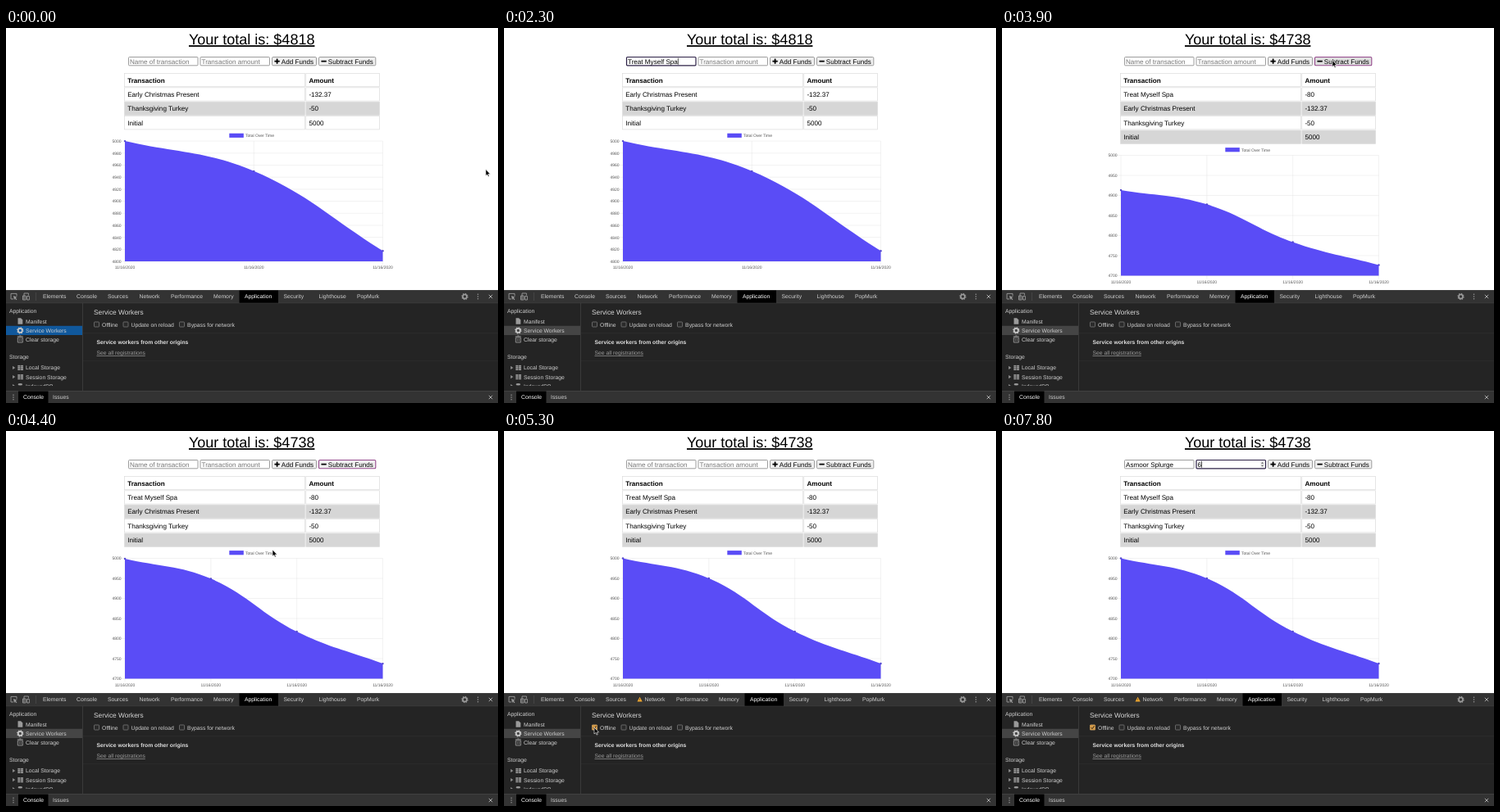
An HTML page that plays this animation: 600x458 px, repeating every 8 s.

```html
<!DOCTYPE html>
<html lang="en">
<head>
<meta charset="utf-8">
<title>Budget tracker</title>
<style>
  html, body { margin: 0; width: 100%; height: 100%; overflow: hidden; background: #fff; }
  svg { display: block; width: 600px; height: 458px; }
  text {
    font-family: "Liberation Sans", Arial, sans-serif;
    text-rendering: geometricPrecision;
    white-space: pre;
  }
</style>
</head>
<body>
<svg id="stage" viewBox="0 0 600 458"></svg>
<script>
const LOOP = 8000, STEP = 100;
const SUBMIT = 3800, CHART_START = 3633, CHART_MS = 1000;
const OFFLINE = 5300;
const BLUE = '#5a4cf6', PALE = '#cfcfcf', GREY = '#9a9a9a';
const stage = document.getElementById('stage');

function add(parent, tag, attrs = {}, content) {
  const node = document.createElementNS('http://www.w3.org/2000/svg', tag);
  set(node, attrs);
  if (content !== undefined) node.textContent = content;
  return parent.appendChild(node);
}
function set(node, attrs) {
  for (const k in attrs) node.setAttribute(k, attrs[k]);
}
const group = (parent, attrs) => add(parent, 'g', attrs);
const rect = (p, x, y, width, height, fill, more) =>
  add(p, 'rect', { x, y, width, height, fill, ...more });
const path = (p, d, attrs) => add(p, 'path', { d, fill: 'none', ...attrs });
// y is the middle of the capitals
const label = (p, str, x, y, size, fill, more) =>
  add(p, 'text', { x, y: y + size * 0.36, 'font-size': size, fill, ...more }, str);
const show = (node, on) => node.setAttribute('visibility', on ? 'visible' : 'hidden');

// ---------- budget page ----------
const SIZE = 8.1;
const title = label(stage, '', 299.7, 13.6, 18, '#000',
  { 'text-anchor': 'middle', 'text-decoration': 'underline' });

function makeInput(x, hint) {
  const box = rect(stage, x + 0.5, 35.5, 84.5, 10.3, '#fff', { rx: 1 });
  const text = label(stage, '', x + 2, 40.6, SIZE, '#000');
  const caret = rect(stage, 0, 36.7, 0.7, 8, '#000');
  return (value, focused, blinkOff) => {
    set(box, { stroke: focused ? '#2c2046' : '#858585', 'stroke-width': focused ? 1.2 : 0.8 });
    text.textContent = value || hint;
    set(text, { fill: value ? '#000' : '#757575' });
    caret.setAttribute('x', x + 2 + (value ? text.getComputedTextLength() : 0));
    show(caret, focused && !blinkOff);
  };
}
const nameInput = makeInput(149, 'Name of transaction');
const amountInput = makeInput(236.5, 'Transaction amount');

const spinner = group(stage);
rect(spinner, 315, 36.6, 5, 8.2, '#efefef', { rx: 1 });
path(spinner, 'M316 39.7l1.5-1.7 1.5 1.7zM316 41.7l1.5 1.7 1.5-1.7z', { fill: '#555' });

function makeButton(x, width, text) {
  const box = rect(stage, x + 0.5, 35.5, width, 10.3, '#efefef',
    { rx: 1.3, stroke: '#858585', 'stroke-width': 0.8 });
  rect(stage, x + 3.4, 39.7, 6.4, 1.8, '#000', { rx: 0.4 });
  label(stage, text, x + 11.8, 40.6, SIZE, '#000');
  return box;
}
makeButton(324, 54, 'Add Funds');
rect(stage, 329.7, 37.4, 1.8, 6.4, '#000', { rx: 0.4 });
const subtract = makeButton(381, 69.3, 'Subtract Funds');

const ROW = 17.4;
function makeTable(parent, rows) {
  [['Transaction', 'Amount'], ...rows].forEach((cells, i) => {
    const y = 55.4 + i * ROW, fill = i && i % 2 === 0 ? '#d6d6d6' : '#fff';
    [[144.6, 220], [365.8, 89.8]].forEach(([x, w], c) => {
      rect(parent, x, y, w, 16.3, fill, { stroke: '#dcdcdc', 'stroke-width': 0.7 });
      label(parent, cells[c], x + 3.6, y + 8.3, SIZE, '#000', { 'font-weight': i ? 400 : 700 });
    });
  });
}

// Cardinal-like spline with tension 0.4
function splinePath(pts) {
  const handles = pts.map((p, i) => {
    const a = pts[i - 1] || p, b = pts[i + 1] || p;
    const da = Math.hypot(p[0] - a[0], p[1] - a[1]);
    const db = Math.hypot(b[0] - p[0], b[1] - p[1]);
    const ka = 0.4 * da / (da + db), kb = 0.4 * db / (da + db);
    const dx = b[0] - a[0], dy = b[1] - a[1];
    return [[p[0] - ka * dx, p[1] - ka * dy], [p[0] + kb * dx, p[1] + kb * dy]];
  });
  return 'M' + pts[0] + pts.slice(1).map((p, i) =>
    `C${handles[i][1]} ${handles[i + 1][0]} ${p}`).join('');
}

function makeChart(parent, top, low, tick, values) {
  const left = 145, wide = 314.5, high = 147, base = top + high;
  const grid = { stroke: '#e4e4e4', 'stroke-width': 0.5 };
  const small = (str, x, y, anchor) =>
    label(parent, str, x, y, 5, '#555', { 'text-anchor': anchor });
  rect(parent, 272.3, top - 9.4, 17.5, 5.2, BLUE);
  small('Total Over Time', 292, top - 6.7, 'start');
  for (let v = low; v <= 5000; v += tick) {
    const y = base - (v - low) / (5000 - low) * high;
    path(parent, `M${left - 4} ${y}H${left + wide}`, grid);
    small(v, 140.6, y, 'end');
  }
  const pts = values.map((v, i) => [
    left + wide * i / (values.length - 1),
    base - (v - low) / (5000 - low) * high
  ]);
  pts.forEach(([x]) => {
    path(parent, `M${x} ${top}V${base + 4}`, grid);
    small('11/16/2020', x, base + 7.3, 'middle');
  });
  const area = path(parent, '', { fill: BLUE });
  const dots = pts.map(([x]) => add(parent, 'circle', { cx: x, r: 1.2, fill: '#5347cf' }));
  return grow => {
    const now = pts.map(([x, y]) => [x, base + (y - base) * grow]);
    area.setAttribute('d', splinePath(now) + `V${base}H${left}Z`);
    now.forEach((p, i) => dots[i].setAttribute('cy', p[1]));
  };
}

const history = [['Early Christmas Present', '-132.37'], ['Thanksgiving Turkey', '-50'], ['Initial', '5000']];
const before = group(stage), after = group(stage);
makeTable(before, history);
makeTable(after, [['Treat Myself Spa', '-80'], ...history]);
makeChart(before, 138.1, 4800, 20, [5000, 4950, 4817.63])(1);
const growChart = makeChart(after, 155.5, 4700, 50, [5000, 4950, 4817.63, 4737.63]);

// ---------- developer tools ----------
const UI = 6.8;
const tools = group(stage);
rect(tools, 0, 320, 600, 138, '#242424');
rect(tools, 0, 320, 600, 16, '#333');
rect(tools, 0, 320, 600, 0.6, '#484848');
rect(tools, 0, 335.6, 600, 0.6, '#404040');
rect(tools, 93, 336, 0.7, 107, '#454545');
rect(tools, 36, 323, 0.6, 10, '#505050');
rect(tools, 94, 372.5, 506, 0.6, '#333');
rect(tools, 94, 406, 506, 0.6, '#2f2f2f');

const line = { stroke: GREY, 'stroke-width': 0.9 };
path(tools, 'M9 331H6V324.4H13V327.5', line);
path(tools, 'M9 327l4.6 1.8-1.9.8 1.7 1.8-.8.8-1.7-1.8-.8 1.8z', { fill: GREY });
path(tools, 'M22 331.5V324H27.4V326.5M20.5 327H24V332H20.5ZM25.5 327.5H28.4V332H25.5Z', line);

function gear(x, y, fill) {
  const at = { cx: x, cy: y, fill: 'none', stroke: fill };
  add(tools, 'circle', { ...at, r: 2.5, 'stroke-width': 1.7 });
  add(tools, 'circle', { ...at, r: 3.6, 'stroke-width': 1.1, 'stroke-dasharray': '1.41 1.41' });
}
function dots(x, y) {
  [-2.7, 0, 2.7].forEach(d => add(tools, 'circle', { cx: x, cy: y + d, r: 0.75, fill: GREY }));
}
const cross = (x, y) => path(tools,
  `M${x - 2.2} ${y - 2.2}l4.4 4.4m0-4.4l-4.4 4.4`, { stroke: '#b5b5b5', 'stroke-width': 0.9 });
gear(559.5, 328, GREY);
dots(575.5, 328);
cross(591, 328);

const elementsTab = label(tools, 'Elements', 45, 328, UI, PALE);
label(tools, 'Console', 86, 328, UI, PALE);
label(tools, 'Sources', 124, 328, UI, PALE);
const warning = group(tools);
path(warning, 'M165.6 324.8l3.1 5.7h-6.2z', { fill: '#f0a830' });
rect(warning, 165.3, 326.8, 0.6, 2, '#4a3510');
const lateTabs = group(tools);
rect(lateTabs, 284.5, 320.5, 47.5, 15.2, '#000');
[['Network', 162.5], ['Performance', 201], ['Memory', 253], ['Application', 291],
 ['Security', 338.5], ['Lighthouse', 381.5], ['PopMurk', 428]]
  .forEach(([s, x]) => label(lateTabs, s, x, 328, UI, s === 'Application' ? '#fff' : PALE));

label(tools, 'Application', 4, 345.2, UI, PALE);
const selected = rect(tools, 0, 363.8, 93, 11.2, '#454545');
path(tools, 'M14.5 354.3h3.6l2.2 2.2v5.2h-5.8z', { fill: GREY });
label(tools, 'Manifest', 24, 358.1, UI, PALE);
gear(17.3, 369.4, '#c8c8c8');
label(tools, 'Service Workers', 24, 369.4, UI, PALE);
path(tools, 'M14.3 378h6v6h-6zM13.8 376.8h7M16.3 376h2', { stroke: GREY, 'stroke-width': 0.9 });
path(tools, 'M16.3 379.4v3.2m2-3.2v3.2', { stroke: GREY, 'stroke-width': 0.7 });
label(tools, 'Clear storage', 24, 380.6, UI, PALE);
label(tools, 'Storage', 4, 401.9, UI, PALE);

['Local Storage', 'Session Storage', 'IndexedDB'].forEach((s, i) => {
  const y = 414.9 + i * 11.2;
  path(tools, `M8 ${y - 2.2}l3.4 2.2-3.4 2.2z`, { fill: '#888' });
  if (i < 2) {
    for (let k = 0; k < 6; k++)
      rect(tools, 14.3 + (k % 2) * 3.6, y - 3 + (k >> 1) * 2.2, 3.1, 1.7, GREY);
  } else {
    add(tools, 'ellipse', { cx: 17.3, cy: y - 2, rx: 2.8, ry: 1.2, fill: GREY });
  }
  label(tools, s, 24, y, UI, PALE);
});
rect(tools, 0, 437, 93, 6, '#242424');

label(tools, 'Service Workers', 107, 347.2, 8.3, '#d8d8d8');
[['Offline', 107.5], ['Update on reload', 143], ['Bypass for network', 211.5]].forEach(([s, x]) => {
  rect(tools, x, 359, 6, 6, '#2a2a2a', { rx: 0.8, stroke: '#858585', 'stroke-width': 0.7 });
  label(tools, s, x + 9.6, 362.1, UI, PALE);
});
const checked = group(tools);
rect(checked, 107.2, 358.7, 6.6, 6.6, '#d39a48', { rx: 0.9 });
path(checked, 'M108.6 362.2l1.4 1.5 2.5-3.4', { stroke: '#2a2014', 'stroke-width': 1 });
label(tools, 'Service workers from other origins', 110.5, 383.3, 6.75, '#e0e0e0', { 'font-weight': 700 });
label(tools, 'See all registrations', 110.5, 396.8, 6.75, '#9c9c9c', { 'text-decoration': 'underline' });

rect(tools, 0, 443, 600, 15, '#333');
rect(tools, 0, 443, 600, 0.6, '#4a4a4a');
rect(tools, 15, 443.6, 36.5, 14.4, '#000');
dots(9, 451);
label(tools, 'Console', 21, 450.9, UI, '#fff');
label(tools, 'Issues', 57, 450.9, UI, PALE);
cross(591, 451);

// ---------- pointer ----------
const pointer = group(stage);
const shapes = {
  arrow: path(pointer, 'M0 0V8L1.8 6.4 3 9.1 4.3 8.5 3.1 5.9H5.6Z',
    { fill: '#000', stroke: '#fff', 'stroke-width': 0.6 }),
  beam: path(pointer, 'M-1.6-4Q0-4 0-3Q0-4 1.6-4M0-3V3M-1.6 4Q0 4 0 3Q0 4 1.6 4',
    { stroke: '#222', 'stroke-width': 0.7 }),
  hand: path(pointer, 'M-.7.6Q0-.5.8.6V3.6Q1.7 2.9 2.3 3.9 3.2 3.2 3.7 4.2 5 3.9 5 5V7L4 9.3H0L-2.4 5.8Q-2.4 4.6-.7 5.5Z',
    { fill: '#000', stroke: '#fff', 'stroke-width': 0.6 })
};
// Each trip: [time, x, y]; the pointer is hidden between trips.
const trips = [
  [[0, 585, 172.5], [100, 570, 166], [300, 425, 112], [500, 255, 60], [700, 185, 42], [800, 180, 41], [1000, 180, 41]],
  [[3000, 182, 43], [3100, 230, 68], [3200, 335, 56], [3300, 424, 27], [3400, 412, 36], [3500, 402.8, 39.4],
   [4200, 402.8, 39.4], [4300, 394, 62], [4400, 325, 145], [4500, 205, 245], [4600, 112, 310], [4700, 72, 330.4],
   [4800, 74, 335], [5000, 100, 357], [5100, 110, 362], [5400, 110, 362], [5500, 122, 325], [5700, 165, 150],
   [5900, 178, 44], [6000, 180, 41], [6200, 180, 41]]
];
function movePointer(t) {
  const trip = trips.find(k => t >= k[0][0] && t < k[k.length - 1][0]);
  pointer.setAttribute('display', trip ? 'inline' : 'none');
  if (!trip) return;
  const i = trip.findIndex(k => k[0] > t);
  const [t0, x0, y0] = trip[i - 1], [t1, x1, y1] = trip[i];
  const k = (t - t0) / (t1 - t0);
  const x = x0 + (x1 - x0) * k, y = y0 + (y1 - y0) * k;
  const kind = x > 149 && x < 235 && y > 35 && y < 46 ? 'beam' : y > 322 && y < 337 && x < 90 ? 'hand' : 'arrow';
  for (const s in shapes) show(shapes[s], s === kind);
  pointer.setAttribute('transform', `translate(${x} ${y})`);
}

// ---------- timeline ----------
const SPA = 'Treat Myself Spa', SPLURGE = 'Asmoor Splurge';
// [time, field contents]
const prefix = (word, keys) => keys.map(([t, n]) => [t, word.slice(0, n)]);
const nameKeys = [[0, ''],
  ...prefix(SPA, [[1000, 1], [1100, 3], [1400, 5], [1600, 6], [1700, 7], [1800, 9], [1900, 10],
    [2000, 12], [2100, 13], [2200, 15], [2300, 16]]),
  [SUBMIT, ''],
  ...prefix(SPLURGE, [[6200, 1], [6300, 3], [6400, 5], [6500, 7], [6600, 8], [6700, 10], [6800, 12], [7000, 14]])];
const amountKeys = [[0, ''], [2700, '8'], [2800, '80'], [SUBMIT, ''], [7700, '6']];
const focusKeys = [[0, 'tools'], [700, 'name'], [2500, 'amount'], [3600, 'subtract'],
  [5200, 'page'], [6000, 'name'], [7200, 'amount']];
const valueAt = (keys, t) => keys.filter(k => k[0] <= t).pop()[1];

function draw(t) {
  const done = t >= SUBMIT, offline = t >= OFFLINE, focus = valueAt(focusKeys, t);
  title.textContent = 'Your total is: $' + (done ? 4738 : 4818);
  nameInput(valueAt(nameKeys, t), focus === 'name');
  amountInput(valueAt(amountKeys, t), focus === 'amount', t >= 7500 && t < 7700);
  show(spinner, focus === 'amount');

  const pressed = focus === 'subtract';
  set(subtract, {
    fill: t >= 3400 && t < 4300 ? '#dedede' : '#efefef',
    stroke: pressed ? '#94488c' : '#858585',
    'stroke-width': pressed ? 1.1 : 0.8
  });

  show(before, !done);
  show(after, done);
  const p = Math.min(1, Math.max(0, (t - CHART_START) / CHART_MS));
  growChart(1 - (1 - p) ** 4);

  selected.setAttribute('fill', focus === 'tools' ? '#10589c' : '#454545');
  elementsTab.setAttribute('fill', t >= 4700 && t < 4900 ? '#fff' : PALE);
  lateTabs.setAttribute('transform', `translate(${offline ? 9 : 0} 0)`);
  show(warning, offline);
  show(checked, offline);
  movePointer(t);
}

const start = performance.now();
function tick() {
  const t = (performance.now() - start) % LOOP;
  draw(Math.floor(t / STEP) * STEP);
  requestAnimationFrame(tick);
}
tick();
</script>
</body>
</html>
```
